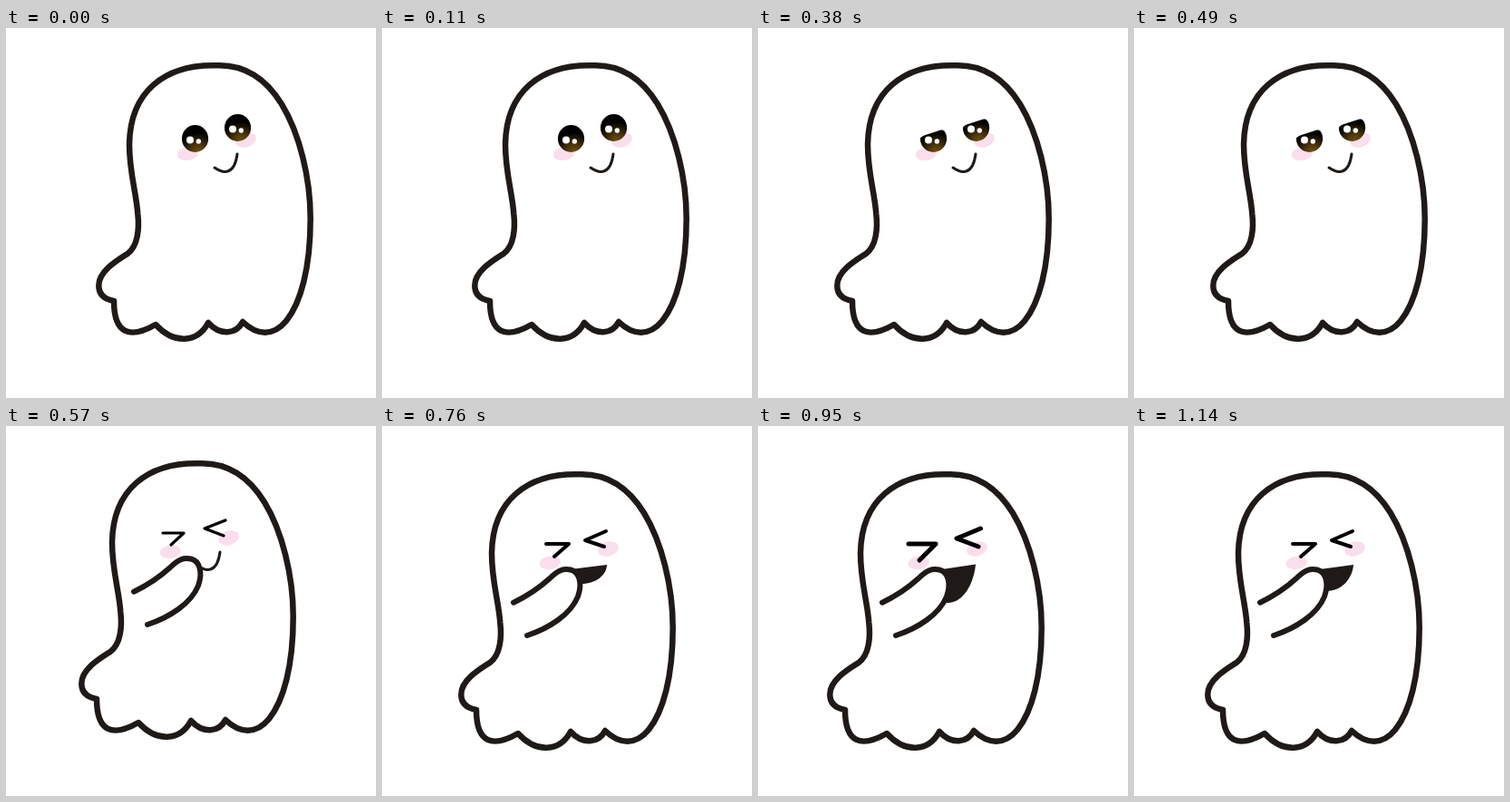
An HTML page that plays this animation: 408x408 px, repeating every 1.33 s.

```html
<!DOCTYPE html>
<html lang="en">
<head>
<meta charset="utf-8">
<title>Giggling ghost</title>
<style>
  html, body { margin: 0; width: 100%; height: 100%; overflow: hidden; background: #fff; }
  svg { display: block; width: 100vw; height: 100vh; }
  .line { fill: none; stroke: #1f1a17; stroke-width: 6; stroke-linecap: round; stroke-linejoin: round; }
  .body, .arm { fill: #fff; }
  .body { stroke-width: 6.5; }
  .smile { stroke-width: 3; }
  .squint { stroke: #000; stroke-width: 4; }
  .mouth { fill: #1f1a17; }
  .cheek { fill: #fadeed; }

  /* Each pose holds one seventh of the loop */
  .pose {
    visibility: hidden;
    animation: hold 1330ms step-end infinite;
    animation-delay: calc(var(--i) * 190ms - 1330ms);
  }
  @keyframes hold {
    0% { visibility: visible; }
    14.28572%, 100% { visibility: hidden; }
  }
</style>
</head>
<body>
<svg viewBox="0 0 408 408">
  <defs>
    <radialGradient id="iris" cx=".62" cy="1" r=".72">
      <stop offset="0" stop-color="#73530f"/>
      <stop offset=".4" stop-color="#4b360b"/>
      <stop offset="1" stop-color="#000"/>
    </radialGradient>
    <clipPath id="lid1"><path d="M-16 -1C-11 -11 2 -13 16 -10V20H-16Z"/></clipPath>
    <clipPath id="lid2"><path d="M-16 2C-14 -2 -12 -3 -9 -4L8 -9.5C11 -10 12 -9 16 -4V20H-16Z"/></clipPath>

    <g id="eye">
      <ellipse rx="14.6" ry="15" fill="url(#iris)"/>
      <circle cx="-5.5" cy="1.5" r="4" fill="#fff"/>
      <circle cx="3.8" cy="3" r="2.7" fill="#fff"/>
    </g>

    <g id="ghost">
      <path class="line body" d="M232 41.3C265 40 288 58 304 84C323.5 116 335.7 165 335.7 210C335.7 265 325 303 309 323
        C295 340 277 339.5 261 324C254 338 236 339.5 223 325C211 347.5 185 349 165 327C137 343 119 338 119 301
        C108 299 102.3 293 102.3 284C102.3 268 123 256 134 249C146 240 147 220 145.3 205C143.5 180 136 160 136 128
        C137 70 175 40 232 41.3Z"/>
      <ellipse class="cheek" rx="11.7" ry="7.3" transform="translate(200.3 138.7) rotate(-8)"/>
      <ellipse class="cheek" rx="11.7" ry="7.8" transform="translate(264.5 123.5) rotate(-18)"/>
    </g>

    <path id="smile" class="line smile" d="M230 154C240 161 252 162 255 139"/>
    <path id="arm" class="line arm" d="M160 182.7C175 175.5 189 166 200 156C209 147 215 144.7 223 146.5
      C233 149 236 162 231 176C223 196 199 211 175 219"/>
    <path id="squint" class="line squint" d="M196 118L221 118L205 132M262 104L239 114L260 121"/>
  </defs>

  <g class="pose" style="--i:0">
    <use href="#ghost"/><use href="#smile"/>
    <use href="#eye" x="208.5" y="122"/>
    <use href="#eye" x="255.5" y="110"/>
  </g>

  <g class="pose" style="--i:1" transform="translate(-15 0)">
    <use href="#ghost"/><use href="#smile"/>
    <g transform="translate(208.5 122)"><use href="#eye" clip-path="url(#lid1)"/></g>
    <g transform="translate(255.5 110)"><use href="#eye" clip-path="url(#lid1)"/></g>
  </g>

  <g class="pose" style="--i:2" transform="translate(-15 0)">
    <use href="#ghost"/><use href="#smile"/>
    <g transform="translate(208.5 122)"><use href="#eye" clip-path="url(#lid2)"/></g>
    <g transform="translate(255.5 110)"><use href="#eye" clip-path="url(#lid2)"/></g>
  </g>

  <g class="pose" style="--i:3" transform="translate(-19 0)">
    <use href="#ghost"/><use href="#smile"/>
    <path class="line squint" style="stroke-width:3.2" d="M192 118L215 118L201 131M261 104L238 113L259 121"/>
    <use href="#arm"/>
  </g>

  <g class="pose" style="--i:4" transform="translate(-15 12)">
    <use href="#ghost"/><use href="#squint"/>
    <path class="mouth" d="M223 146L263 141C263 152 251 162 235 162L225 160Z"/>
    <use href="#arm"/>
  </g>

  <g class="pose" style="--i:5" transform="translate(-23 12)">
    <use href="#ghost"/>
    <path class="line squint" style="stroke-width:5" d="M189 118L219 118L201 136M268.5 101L242 112L266 121"/>
    <path class="mouth" d="M226 146L263 140.5C261 162 249 184 231 183Z"/>
    <use href="#arm"/>
  </g>

  <g class="pose" style="--i:6" transform="translate(-21 12)">
    <use href="#ghost"/><use href="#squint"/>
    <path class="mouth" d="M226 146L263 141C262 156 250 170 234 170Z"/>
    <use href="#arm"/>
  </g>
</svg>
</body>
</html>
```
